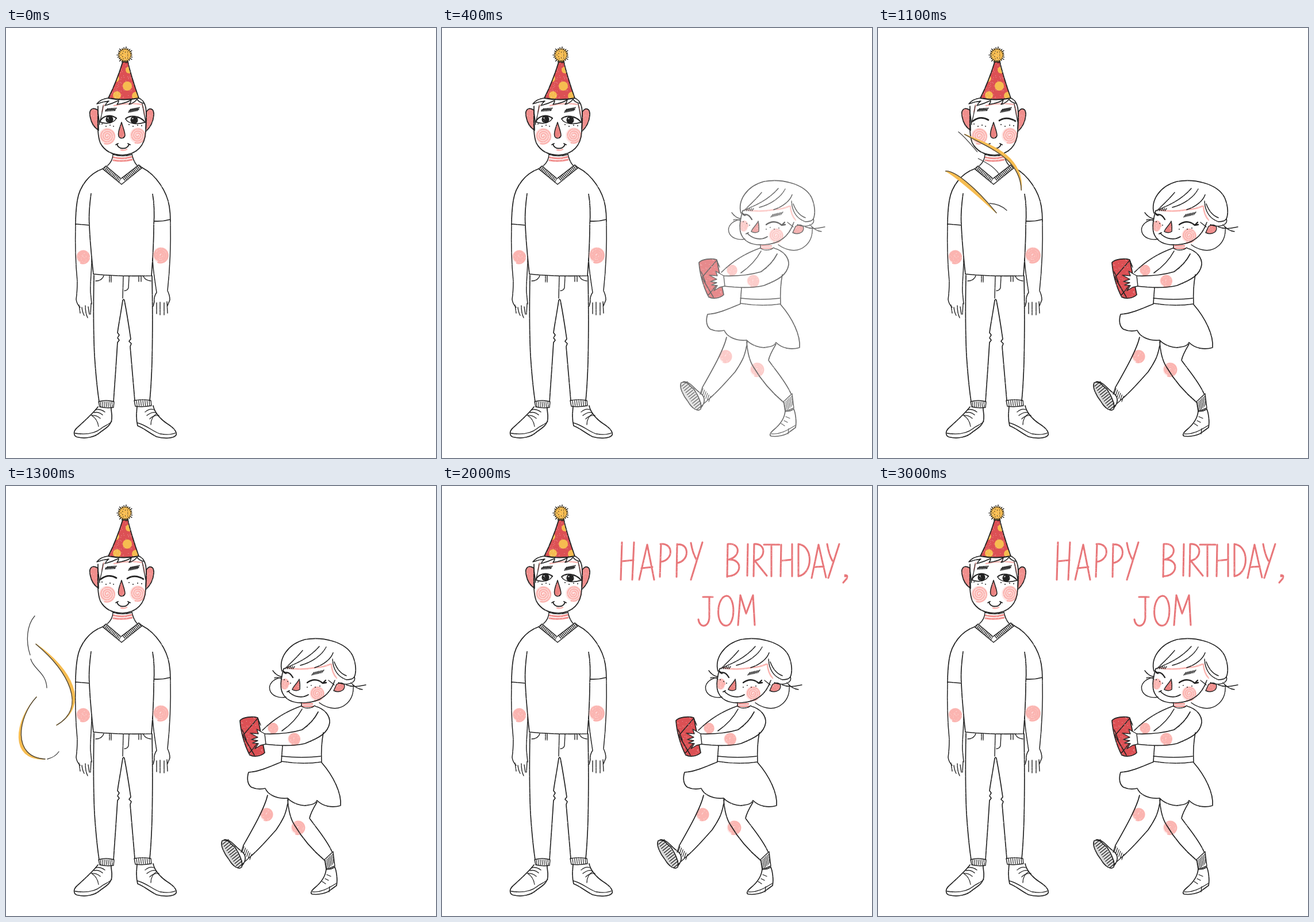
An HTML page with a canvas for the animation above (3.1 s loop, 748 px wide and 748 px high).

```html
<!DOCTYPE html>
<html lang="en">
<head>
<meta charset="utf-8">
<title>Birthday card</title>
<style>
  html, body { margin: 0; width: 100%; height: 100%; overflow: hidden; background: #fff; }
  canvas { display: block; width: 100vw; height: 100vh; }
</style>
</head>
<body>
<canvas id="stage" width="748" height="748" role="img" aria-label="Happy birthday, JOM"></canvas>
<script>
const SIZE = 748, STEP = 100, STEPS = 31;
const INK = '#222', RED = '#dc5054', GOLD = '#f6bc50', PINK = '#f08e8c', BLUSH = '#fbb4b0', LETTER = '#e8777a';
const stage = document.getElementById('stage').getContext('2d');
let g = stage;

function random(seed) {
  return () => (seed = (seed * 16807) % 2147483647) / 2147483647;
}

function line(d, width = 1.7, color = INK) {
  g.lineWidth = width;
  g.strokeStyle = color;
  g.stroke(new Path2D(d));
}

function shape(d, fill, width = 1.7) {
  g.fillStyle = fill;
  g.fill(new Path2D(d));
  if (width) line(d, width);
}

function dot(x, y, r, color = INK) {
  g.fillStyle = color;
  g.beginPath();
  g.arc(x, y, r, 0, Math.PI * 2);
  g.fill();
}

// n parallel ticks of size (dx, dy), spread from (x1, y1) to (x2, y2)
function ticks(x1, y1, x2, y2, dx, dy, n, width = 1.2) {
  let d = '';
  for (let i = 0; i < n; i++) {
    const k = i / (n - 1);
    d += `M${x1 + (x2 - x1) * k} ${y1 + (y2 - y1) * k}l${dx} ${dy}`;
  }
  line(d, width);
}

function swirl(x, y, r, width = 2.6, turns = 3.3, squash = 1) {
  g.globalAlpha = 0.3;
  g.fillStyle = BLUSH;
  g.beginPath();
  g.ellipse(x, y, r * squash, r, 0, 0, Math.PI * 2);
  g.fill();
  g.globalAlpha = 1;
  g.beginPath();
  for (let i = 0; i <= 90; i++) {
    const a = i / 90 * turns * Math.PI * 2, q = r * (0.1 + 0.85 * i / 90);
    g.lineTo(x + Math.cos(a) * q * squash, y + Math.sin(a) * q);
  }
  g.lineWidth = width;
  g.strokeStyle = BLUSH;
  g.stroke();
}

// Pencil grain: small gaps rubbed out of a layer
function grain(seed) {
  const rnd = random(seed);
  g.save();
  g.globalCompositeOperation = 'destination-out';
  g.globalAlpha = 0.4;
  for (let i = 0; i < 22000; i++) g.fillRect(rnd() * SIZE, rnd() * SIZE, 1.1, 1.1);
  g.restore();
}

function layer(draw, seed) {
  const canvas = document.createElement('canvas');
  canvas.width = canvas.height = SIZE;
  g = canvas.getContext('2d');
  g.lineCap = g.lineJoin = 'round';
  draw();
  grain(seed);
  g = stage;
  return canvas;
}

function hat() {
  const cone = 'M203 59C196 82 187 104 178 122Q205 127 231 122C225 104 217 82 212 59Z';
  g.save();
  g.clip(new Path2D(cone));
  shape(cone, RED, 0);
  [[214, 73, 6], [191, 88, 6], [211, 101, 8], [193, 117, 7], [226, 118, 7]]
    .forEach(([x, y, r]) => dot(x, y, r, GOLD));
  g.restore();
  line(cone, 1.8);
  dot(207, 47, 11.5, GOLD);
  for (let i = 0; i < 22; i++) {
    const a = i / 22 * Math.PI * 2, c = Math.cos(a), s = Math.sin(a), r = 12 + i % 3;
    line(`M${207 + c * 10} ${47 + s * 10}L${207 + c * r} ${47 + s * r}`, 1.6);
    if (i % 2) dot(207 + c * (i % 4 + 4), 47 + s * (i % 4 + 4), 0.7);
  }
}

function manHead() {
  shape('M160 143C150 136 144 143 146 153C148 165 153 173 161 178Z', PINK);
  shape('M244 146C250 137 258 140 257 152C256 164 250 174 243 180Z', PINK);
  line('M188 135Q212 129 236 133M238 136Q241 144 241 152M170 134L167 146', 2.4, BLUSH);
  swirl(176, 188, 14.5);
  swirl(229, 187, 14);
  line('M160 136C160 160 158 185 164 200C172 215 186 221 203 221C228 220 242 204 243 180C244 165 245 150 243 138C241 129 237 124 231 122');
  line('M177 122C169 123 162 127 158 132Q169 128 179 127Q174 131 172 135Q184 132 196 126Q196 130 193 133Q208 131 218 125Q217 130 214 133Q222 131 228 124Q232 130 240 131', 1.5);
  line('M169 135Q167 150 163 165M237 132Q240 148 243 163M160 145L163 168', 1.3);
  ticks(173, 145, 188, 144, 4, -5, 7, 1.4);
  ticks(213, 147, 228, 144, 4, -6, 7, 1.4);
  line('M173 143Q182 139 190 143M214 144Q222 139 231 142', 1.4);
  [[167, 167], [174, 171], [181, 169], [187, 171], [214, 168], [221, 171], [229, 169], [236, 170]]
    .forEach(([x, y]) => dot(x, y, 1));
  shape('M201 164C198 173 193 185 197 190C200 193 206 192 207 187C207 180 203 172 201 164Z', '#ea8280', 1.5);
  line('M200 212Q205 214 210 211', 2.5, BLUSH);
  line('M193 202C196 212 211 212 214 202M191 203L195 201M212 201L216 203', 1.9);
}

function manBody() {
  line('M187 225Q203 229 219 224M187 230Q203 233 219 229', 3, PINK);
  line('M186 220Q203 225 219 220M186 219C186 229 182 235 176 240M219 219C221 229 224 235 228 239', 1.5);
  line('M174 240L200 262L231 238L237 243L201 272L168 245Z', 1.5);
  ticks(173, 241, 199, 263, -3, 5, 13, 1.4);
  ticks(203, 260, 231, 239, 4, 5, 13, 1.4);
  line('M168 245C145 253 128 275 124 300C121 320 121 335 121 342M121 341L145 343M148 288C145 310 144 330 145 343C146 370 149 400 152 428C180 431 220 432 253 431C255 405 257 380 257 345C258 330 258 305 255 289M237 243C262 256 280 285 284 310Q286 322 286 336M258 336Q272 337 286 333');
  swirl(134, 398, 12, 3.4);
  swirl(269, 395, 14, 3.4);
  line('M121 342C120 380 121 410 124 440C124 455 123 465 122 472Q123 480 129 486M149 402C149 425 146 445 147 460L149 480M286 336C287 380 285 420 281 457Q285 465 285 473L281 483M255 402C256 425 260 445 262 460Q257 467 258 476L256 484', 1.5);
  line('M127 482L129 496M132 486Q133 495 136 500M138 483Q138 496 142 504M143 485L145 498M148 479L147 498M262 478L262 497M268 477L268 499M275 478L275 499M280 476L281 496', 1.4);
}

function manLegs() {
  line('M153 430C152 480 152 530 154 570C156 600 159 630 162 650M254 431C255 480 255 540 254 580C253 610 252 630 250 648');
  line('M187 650C189 620 192 580 194 547l3-4l-3-4l3-5l-3-4C196 515 200 495 203 474Q205 470 206 474C211 500 214 520 217 541l-3 4l4 4l-2 5C219 590 222 625 224 648');
  line('M204 432L203 470M214 432L213 452Q211 457 206 457M156 440Q167 440 170 431M239 432Q242 439 252 440M180 431V442M183 431V442M231 431V441M235 431V441', 1.4);
  line('M161 650Q174 646 188 650L187 660Q175 662 163 659ZM223 648Q238 645 252 648L253 657Q238 660 225 658Z', 1.4);
  ticks(164, 650, 184, 650, 1, 9, 7);
  ticks(227, 648, 249, 648, 1, 9, 7);
  line('M160 659C150 672 135 685 124 695C116 702 117 711 126 712C140 715 155 711 163 704C172 697 183 692 184 680C185 670 182 664 183 660M228 658C227 670 226 680 229 692C240 696 250 705 262 711C275 715 292 714 296 708C298 700 288 693 280 688C268 680 258 668 256 657');
  line('M120 705C140 708 155 705 165 697C172 691 180 690 184 684M229 687C245 691 255 702 268 706Q284 709 296 704M149 674Q159 680 161 693M262 671Q252 677 252 690', 1.3);
  line('M156 664Q164 662 172 668M153 669Q161 667 168 673M149 674Q157 673 164 679M242 668Q250 661 257 664M245 674Q254 667 261 669M250 680Q257 673 266 674', 1.3);
}

function eyesOpen() {
  line('M163 163C168 153 181 149 192 157M208 158C215 151 233 152 242 164', 2.2);
  line('M163 163C170 167 186 168 192 157M208 158C213 168 230 168 242 164', 1.5);
  [[180, 159], [223, 160]].forEach(([x, y]) => {
    dot(x, y, 6.6);
    dot(x - 2.5, y - 2.5, 1.1, '#fff');
  });
}

function eyesClosed() {
  line('M165 162Q178 152 192 160M211 161Q224 153 239 162', 2.7);
}

function girlHead() {
  shape('M575 345C587 338 593 348 586 355Q579 360 570 356Z', PINK, 1.4);
  line('M488 316Q510 321 538 316Q553 315 564 310M566 310Q567 325 575 334', 2.6, BLUSH);
  swirl(541, 361, 13);
  swirl(485, 345, 10, 2.4, 3, 0.75);
  line('M480 322C474 300 490 275 520 267C550 262 590 270 603 295C610 312 609 325 606 332');
  line('M483 318C478 335 476 350 481 360C488 375 505 378 520 377C548 376 564 362 572 338');
  line('M483 318C505 309 528 299 545 279M490 313Q508 296 516 286M512 312C532 307 550 294 557 280M537 316C553 311 566 300 569 290M568 301C569 320 578 332 592 337Q603 337 606 332M571 306Q578 325 592 330M606 332C610 343 593 348 578 342', 1.5);
  line('M604 347C606 375 585 390 565 386C555 384 549 380 545 377M479 333C465 335 456 345 459 355C462 365 475 370 487 367M464 321Q470 330 480 332M467 334Q473 331 480 336M592 346C605 351 615 348 626 346M600 342Q609 353 620 354M571 346L561 338', 1.4);
  ticks(486, 318, 499, 318, 3, -4, 5, 1.3);
  ticks(532, 329, 549, 325, 4, -5, 7, 1.3);
  line('M484 325Q493 322 499 333M482 322L487 326M524 342Q538 332 551 343L556 338M551 343L557 342', 2.3);
  [[484, 337], [490, 340], [495, 343], [524, 350], [531, 347], [538, 350], [546, 348]]
    .forEach(([x, y]) => dot(x, y, 0.9));
  shape('M510 336C506 344 499 349 498 354Q505 358 511 354Q512 346 510 336Z', '#ea8280', 1.5);
  line('M491 357C500 367 515 370 526 363M489 358L493 356', 1.8);
}

function girlBody() {
  line('M514 379H533M515 383H534', 2.4, PINK);
  swirl(464, 421, 9.5, 2.8);
  swirl(501, 440, 11, 2.8);
  line('M514 377V383C520 388 532 387 537 382M513 383C490 391 465 406 446 425M515 388C506 405 493 417 480 426M481 452L479 479M552 429C549 445 548 460 549 480M479 470Q515 474 549 470M479 479Q515 485 549 480', 1.6);
  line('M538 383C555 388 564 400 563 412C560 430 545 438 520 448C500 453 475 452 450 449M447 431C470 432 495 430 515 424Q534 411 543 393');
  line('M479 480C460 488 440 497 422 498C418 510 421 520 427 524Q438 529 451 526C455 536 470 545 490 543C498 552 515 558 526 555Q538 554 541 547C552 558 568 560 582 556C584 535 570 505 549 481');
  shape('M407 408C412 402 428 400 438 403L450 464C444 470 432 472 424 468C414 450 408 425 407 408Z', RED);
  line('M412 434L438 404M423 465L446 437M412 434L432 468M411 424L418 442M438 404L443 416', 1.5);
  shape('M450 431L436 423L439 431L425 430L438 437L427 441L438 443L429 447L439 448L433 457L443 451L452 449Z', '#fff', 1.4);
}

function girlLegs() {
  swirl(453, 571, 11.5, 3);
  swirl(508, 594, 12.5, 3);
  line('M455 538C450 560 430 595 413 625M491 545C488 570 482 580 470 598C455 615 440 632 428 642M490 545C491 560 494 578 502 590C515 612 535 635 554 651M541 550C535 560 530 568 528 578C540 595 558 615 567 636');
  line('M413 625L409 637M428 642L416 653M554 650L569 636L572 661L557 667Z', 1.4);
  ticks(414, 627, 427, 641, -3, 9, 6);
  ticks(556, 651, 568, 640, 2, 16, 6);
  shape('M376 617C385 613 390 622 398 628C406 640 413 655 410 663C405 668 395 662 388 650C380 640 372 625 376 617Z', '#d8d8d8');
  ticks(377, 623, 403, 664, 10, -8, 12, 1.3);
  line('M380 615C392 615 399 628 408 634C417 640 420 650 410 661M557 666C556 680 548 690 537 699C530 705 529 709 533 710C545 712 560 707 564 703L575 695C577 685 575 670 572 663Q564 668 557 666');
  line('M533 706C548 707 559 701 575 691M562 706L563 697M558 676L565 679M555 683L561 686M550 688L556 692', 1.3);
}

const man = layer(() => { manHead(); manBody(); manLegs(); hat(); }, 7);
const girl = layer(() => { girlHead(); girlBody(); girlLegs(); }, 11);
const openEyes = layer(eyesOpen, 3), closedEyes = layer(eyesClosed, 3);

const topLine = [
  'M313 98L311 163M334 98L331 163M312 131L333 129',
  'M343 163L357 102L369 163M347 143L366 141',
  'M381 101L379 158M380 101C402 98 404 128 381 132',
  'M409 101L408 158M409 102C430 98 432 130 409 134',
  'M433 99Q436 117 443 129M453 98L433 163',
  'M497 101L496 158M497 101C520 98 520 124 498 128C524 126 523 157 496 157',
  'M532 101L531 156',
  'M543 101L542 157M543 101C564 99 564 126 544 130L565 156',
  'M560 102H587M573 102V157',
  'M590 102L589 157M609 101V157M590 130L609 128',
  'M620 101V157M620 101C646 104 646 152 620 157',
  'M643 160L655 102L668 159M648 141L664 140',
  'M670 101Q673 119 679 130M691 101L672 160',
  'M701 155Q707 155 704 161L698 168M701 157H704'
];
const nameLine = [
  'M454 193H471M465 193V227C465 247 448 248 446 232',
  'M495 191C477 193 475 242 494 243C511 243 511 192 495 191',
  'M515 242L519 190L529 222L541 190L544 242'
];

function lettering(wide) {
  const rnd = random(29);
  const write = (letters, cx, cy, scale) => letters.forEach(d => {
    const dx = (rnd() - 0.5) * 2, dy = (rnd() - 0.5) * 2;
    g.save();
    if (wide) {
      g.translate(cx + dx, cy + dy);
      g.scale(scale, 1);
      g.translate(-cx, -cy);
    }
    line(d, 3.1, LETTER);
    g.restore();
  });
  write(topLine, 509, 132, 1.009);
  write(nameLine, 495, 217, 1.05);
}
const greetings = [false, true].map((wide, i) => layer(() => lettering(wide), 41 + i));

// Each streamer: Bezier points leaving the popper, passing overhead, and landing behind him
const streamers = [
  { bulge: [6, -4], poses: [
    [373, 279, 395, 285, 424, 330, 425, 402],
    [200, 140, 230, 150, 300, 145, 330, 215],
    [52, 275, 108, 322, 142, 385, 88, 416]] },
  { bulge: [-5, 6], poses: [
    [335, 330, 365, 328, 400, 365, 407, 404],
    [150, 190, 190, 170, 250, 180, 275, 245],
    [53, 367, 20, 402, 10, 472, 68, 475]] },
  { poses: [
    [388, 334, 393, 340, 397, 346, 400, 353],
    [185, 158, 205, 160, 222, 164, 238, 176],
    [50, 226, 36, 242, 34, 270, 42, 294]] },
  { poses: [
    [407, 361, 409, 367, 411, 372, 412, 377],
    [240, 190, 258, 192, 272, 200, 284, 212],
    [43, 301, 48, 319, 70, 325, 71, 351]] },
  { poses: [
    [417, 378, 418, 386, 419, 394, 419, 402],
    [255, 220, 268, 222, 280, 230, 290, 245],
    [72, 475, 80, 473, 88, 468, 92, 462]] }
];

function mix(a, b, k) {
  return a.map((v, i) => v + (b[i] - v) * k);
}

function poseAt([launch, over, land], step) {
  const mouth = launch.map((_, i) => i % 2 ? 402 : 416);
  if (step < 8) return mix(mouth, launch, 0.45);
  if (step < 10) return mix(launch, over, (step - 8) / 2);
  if (step < 13) return mix(over, land, (step - 10) / 3);
  return land.map((v, i) => v + (i % 2 ? (step - 13) * 46 : 0));
}

function drawStreamers(step) {
  g.globalAlpha = step > 13 ? 1 - (step - 13) / 3 : 1;
  streamers.forEach(({ poses, bulge }) => {
    const [x0, y0, x1, y1, x2, y2, x3, y3] = poseAt(poses, step);
    const edge = `M${x0} ${y0}C${x1} ${y1} ${x2} ${y2} ${x3} ${y3}`;
    if (bulge) {
      const [bx, by] = bulge;
      const band = `${edge}C${x2 + bx} ${y2 + by} ${x1 + bx} ${y1 + by} ${x0} ${y0}Z`;
      shape(band, GOLD, step < 10 ? 1.4 : 0);
      if (step >= 10) line(band, 1.6, GOLD);
    }
    line(edge, 1.3, '#444');
  });
  g.globalAlpha = 1;
}

function drawLayer(image, alpha = 1, x = 0) {
  g.globalAlpha = alpha;
  g.drawImage(image, x, 0);
  g.globalAlpha = 1;
}

function render(now) {
  const step = Math.floor(now / STEP) % STEPS;
  g.fillStyle = '#fff';
  g.fillRect(0, 0, SIZE, SIZE);
  g.lineCap = g.lineJoin = 'round';
  drawLayer(man);
  drawLayer(step >= 10 && step < 16 ? closedEyes : openEyes);
  const entry = Math.min(step / 6, 1);
  drawLayer(girl, entry, 120 * (1 - entry));
  if (step >= 7 && step < 16) drawStreamers(step);
  if (step >= 15) drawLayer(greetings[step % 2], Math.min((step - 14) / 3, 1));
}

const start = performance.now();
function tick() {
  render(performance.now() - start);
  requestAnimationFrame(tick);
}
tick();
</script>
</body>
</html>
```
